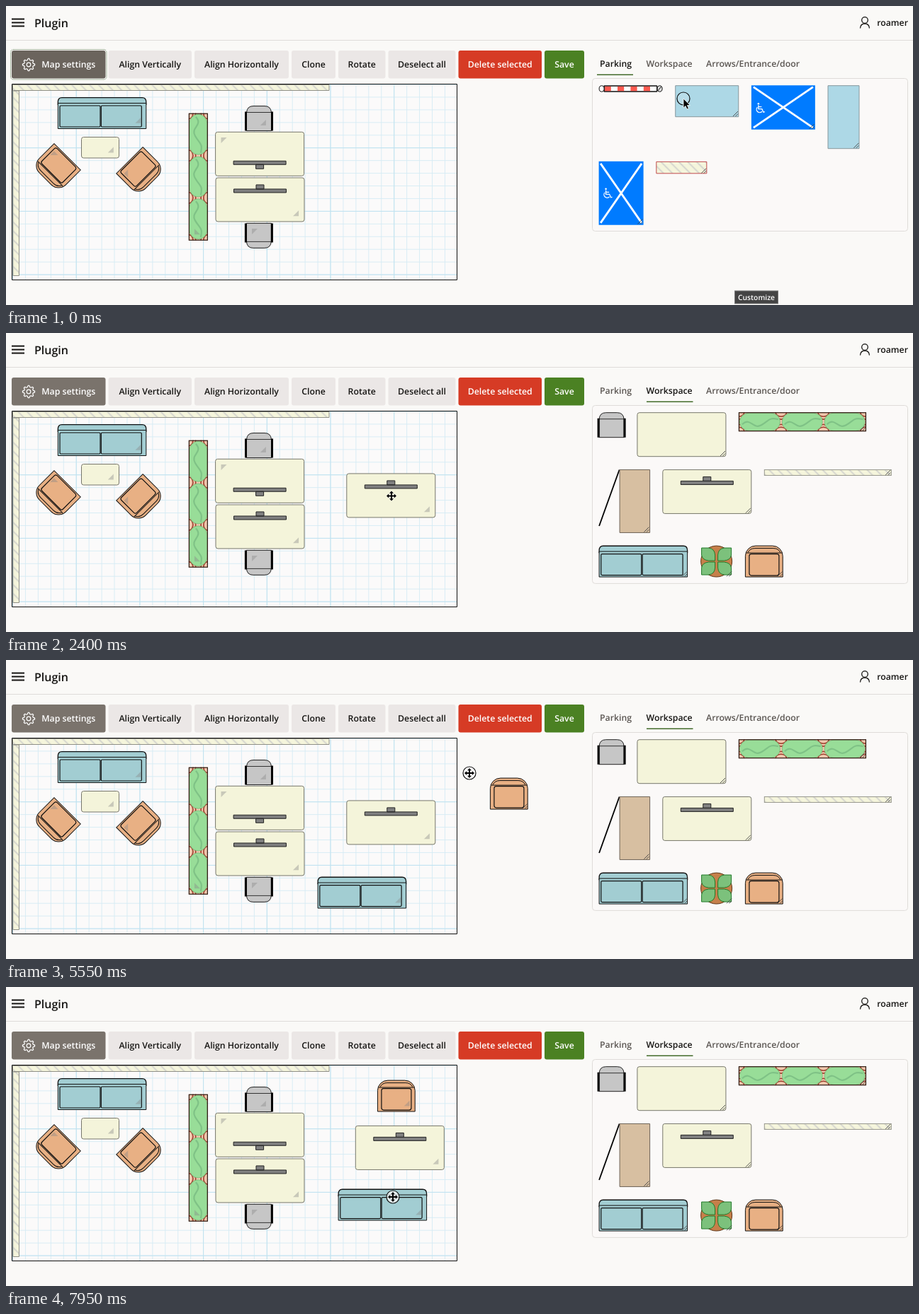
These frames come from a looping animation (1280x423 px, 8000 ms). An HTML page:

```html
<!DOCTYPE html>
<html lang="en">
<head>
<meta charset="utf-8">
<title>Floor plan editor</title>
<style>
html, body { margin: 0; width: 100%; height: 100%; overflow: hidden; background: #faf9f7; }
svg { display: block; width: 100%; height: 100%; }
text { font: 600 12.3px "Open Sans", "Noto Sans", sans-serif; fill: #161513; text-rendering: geometricPrecision; }
.mid { text-anchor: middle; }
.light { fill: #fff; }
.tab { fill: #5b5652; }
.tab.on { fill: #161513; }
</style>
</head>
<body>
<svg viewBox="0 0 1280 423">
  <defs>
    <pattern id="hatch" width="8.9" height="8.9" patternUnits="userSpaceOnUse" patternTransform="rotate(-45)">
      <rect width="9" height="9" fill="#f5f5dc"/><path d="M4.5 0V9" stroke="#d0d0cc" stroke-width="1.7"/>
    </pattern>
    <pattern id="fine" x="9" y="110.5" width="17.94" height="17.94" patternUnits="userSpaceOnUse">
      <path d="M0 .5H18M.5 0V18" stroke="#d5ebf4" stroke-width=".9"/>
    </pattern>
    <pattern id="coarse" x="9" y="110.5" width="89.7" height="89.7" patternUnits="userSpaceOnUse">
      <path d="M0 .5H90M.5 0V90" stroke="#bfe2f0"/>
    </pattern>
    <path id="grip" d="M-8 -1L-1 -8M-4.5 -1L-1 -4.5" stroke="#444" stroke-width=".9"/>
    <path id="corner" d="M-8 -16V-8H-16Z" fill="#888" opacity=".4"/>

    <g id="sofa" fill="#a2cdd2" stroke="#111">
      <path d="M.5 10V7Q.5 .7 6 .7H119.5Q125 .7 125 7V10Z" stroke-width="1.3"/>
      <path d="M.5 8.5H125V44.5H.5Z"/>
      <rect x="3.2" y="12" width="57" height="30" rx="1.5" stroke-width="1.2"/>
      <rect x="61.5" y="12" width="57" height="30" rx="1.5" stroke-width="1.2"/>
    </g>
    <g id="arm" fill="#e8b084" stroke="#111">
      <path d="M.5 44.5V15A14.5 14.5 0 0 1 15 .5H38.8A14.5 14.5 0 0 1 53.3 15V44.5Z"/>
      <path d="M2 10.5H52M4 10Q7 4 14 4H40Q47 4 50 10" fill="none"/>
      <rect x="6" y="12" width="42" height="30.5" rx="3" stroke-width="1.2"/>
    </g>
    <g id="chair" transform="translate(-2)">
      <path d="M2.5 35.5V10Q3 .5 12 .5H28Q37 .5 37.5 10V35.5Z" fill="#c6c6c6" stroke="#222"/>
      <path d="M2.5 9.5H37.5" stroke="#333"/>
      <path d="M1.5 8.5V35.5M38.5 8.5V35.5" stroke="#000" stroke-width="3"/>
    </g>
    <rect id="table" x=".5" y=".5" width="125" height="62" rx="3" fill="#f4f4da" stroke="#77776c"/>
    <g id="desk">
      <use href="#table"/>
      <path d="M26 16.5H100V21.5H26ZM57.5 10.5H68.5V16.5H57.5Z" fill="#808080" stroke="#222"/>
    </g>
    <rect id="coffee" x=".5" y=".5" width="53" height="29.5" rx="3" fill="#f4f4da" stroke="#77776c"/>
    <g id="bush">
      <path d="M0 6q7 0 8-6M0 10q5-1 7-4M0 17q5 1 7 4M0 21q7 0 8 6M60 6q-7 0-8-6M60 10q-5-1-7-4M60 17q-5 1-7 4M60 21q-7 0-8 6" fill="none" stroke="#9a3a28" stroke-width="1.6"/>
      <rect x="1.5" y="1" width="57" height="25" rx="13" fill="#98dd98" stroke="#78b878" stroke-width=".8"/>
      <path d="M5 17C17 6 20 25 32 18S42 7 56 10" fill="none" stroke="#7fc286" stroke-width="2.2"/>
    </g>
    <g id="hedge">
      <rect width="179.5" height="27" fill="#efc7ad"/>
      <use href="#bush"/><use href="#bush" x="59.8"/><use href="#bush" x="119.6"/>
      <rect x=".5" y=".5" width="179" height="26" fill="none" stroke="#2d1a12" stroke-width="1.2"/>
    </g>
    <g id="door">
      <path d="M.5 80L29 .5" stroke="#000" stroke-width="1.8"/>
      <path d="M29.5 .5H72V89.5H29.5Z" fill="#d7bfa1" stroke="#6d6255"/>
    </g>
    <rect id="wall" x=".5" y=".5" width="179" height="8" fill="url(#hatch)" stroke="#96968c"/>
    <path id="leaf" d="M-2 -1H-11Q-20 -2 -21 -9V-19H-11Q-2.5 -18 -2 -9Z" fill="#7cc17c" stroke="#237a2b"/>
    <g id="plant" transform="translate(22.5 22.5)">
      <circle r="22" fill="#c67f4a" stroke="#5c3518"/>
      <use href="#leaf"/><use href="#leaf" transform="scale(-1 1)"/>
      <use href="#leaf" transform="scale(1 -1)"/><use href="#leaf" transform="scale(-1)"/>
    </g>
    <g id="wheelchair" fill="none" stroke="#fff" stroke-width="1.3">
      <circle cx="-2" cy="-6" r="1.3" fill="#fff" stroke="none"/>
      <path d="M-2 -4V1.5H3L5 6 7 5.5M-2 -1.5H2.5M-3.5 -1A4.3 4.3 0 1 0 3 5"/>
    </g>
    <g id="bayH"><path d="M0 0H90V62.5H0Z" fill="#007bff"/>
      <path d="M3 2.5L87 60M87 2.5L3 60" stroke="#fff" stroke-width="2.8"/><use href="#wheelchair" x="12" y="32"/></g>
    <g id="bayV"><path d="M0 0H63V90H0Z" fill="#007bff"/>
      <path d="M2.5 3L60.5 87M60.5 3L2.5 87" stroke="#fff" stroke-width="2.8"/><use href="#wheelchair" x="12" y="45"/></g>
    <path id="spotH" d="M.5 .5H89.5V44.5H.5Z" fill="#add8e6" stroke="#87979c"/>
    <path id="spotV" d="M.5 .5H44.5V89.5H.5Z" fill="#add8e6" stroke="#87979c"/>
    <path id="strip" d="M.5 .5H71.5V17H.5Z" fill="url(#hatch)" stroke="#c04a4a"/>
    <g id="barrier" stroke="#111">
      <path d="M7.5 .8H82V8.8H7.5Z" fill="#fff"/>
      <path d="M8 4.8H82" stroke="#ff5a50" stroke-width="7" stroke-dasharray="9.2"/>
      <path d="M7.5 .8H82V8.8H7.5Z" fill="none" stroke-width="1.2"/>
      <ellipse cx="4" cy="4.8" rx="3.5" ry="4.2" fill="#fff"/>
      <ellipse cx="86" cy="4.8" rx="3.5" ry="4.2" fill="#ddd"/><path d="M83.5 7.5L88 2"/>
    </g>
  </defs>

  <path d="M0 48.5H1280" stroke="#dfdcd9"/>
  <path d="M8 18.5H26M8 23.5H26M8 28.5H26" stroke="#161513" stroke-width="1.8"/>
  <text x="40" y="29.5" style="font-size:16px">Plugin</text>
  <g fill="none" stroke="#161513" stroke-width="1.3">
    <circle cx="1212" cy="20" r="4.3"/><path d="M1205.5 31.5Q1206 25 1212 25T1218.5 31.5"/>
  </g>
  <text x="1273" y="28" text-anchor="end">roamer</text>

  <g id="buttons"></g>
  <rect id="focus" x="6.5" y="61.5" width="135.5" height="42.5" rx="4" fill="none" stroke="#54734a" stroke-dasharray="1 1"/>
  <path id="gear" fill="none" stroke="#fff" stroke-width="1.2" stroke-linejoin="round"/>
  <circle cx="32" cy="83" r="2.8" fill="none" stroke="#fff" stroke-width="1.2"/>

  <path d="M8.5 110.5H636.5V387.5H8.5Z" fill="#fbfafa"/>
  <path d="M8.5 110.5H636.5V387.5H8.5Z" fill="url(#fine)"/>
  <path d="M8.5 110.5H636.5V387.5H8.5Z" fill="url(#coarse)"/>
  <path d="M9.5 111.5H456V119.5H9.5ZM10 120H18.5V381.5H10Z" fill="url(#hatch)" stroke="#8f8f86"/>
  <path d="M8.5 110.5H636.5V387.5H8.5Z" fill="none" stroke="#111"/>
  <g id="board"></g>

  <text class="tab" id="tabParking" x="838" y="86">Parking</text>
  <text class="tab" id="tabWork" x="903.5" y="86">Workspace</text>
  <text class="tab" x="988" y="86">Arrows/Entrance/door</text>
  <path id="underline" stroke="#436b2a" stroke-width="1.5"/>
  <rect id="panel" x="827.5" y="102.5" width="445" rx="4" fill="#fbf9f8" stroke="#dfdcd9"/>
  <g id="parking"></g>
  <g id="workspace"></g>
  <g id="tooltip">
    <rect x="1028.5" y="403" width="61" height="18" fill="#444" stroke="#777"/>
    <text class="mid light" x="1059" y="415.5" style="font-size:10.3px">Customize</text>
  </g>
  <g id="dragged"></g>
  <g id="cursor">
    <circle id="press" r="9" fill="#fff" stroke="#111" stroke-width="1.2"/>
    <path id="arrow" d="M0 0V13.2L3 10.4 5 15 7.4 14 5.4 9.5H9.4Z" fill="#000" stroke="#fff" stroke-width=".8"/>
    <path id="move" d="M0 -7L3 -3.8H1V-1H3.8V-3L7 0 3.8 3V1H1V3.8H3L0 7 -3 3.8H-1V1H-3.8V3L-7 0-3.8 -3V-1H-1V-3.8H-3Z" fill="#000" stroke="#fff" stroke-width=".7" paint-order="stroke"/>
  </g>
</svg>
<script>
const $ = id => document.getElementById(id);
const show = (el, on) => el.style.display = on ? '' : 'none';

// Furniture sizes in grid units.
const UNIT = 8.97;
const SIZE = { sofa: [14, 5], arm: [6, 5], chair: [4, 4], desk: [14, 7], table: [14, 7], coffee: [6, 3.4],
  hedge: [20, 3], door: [8, 10], wall: [20, 1], plant: [5, 5], barrier: [10, 1], bayH: [10, 7], bayV: [7, 10],
  spotH: [10, 5], spotV: [5, 10], strip: [8, 2] };
const sizeOf = kind => SIZE[kind].map(n => n * UNIT);

function item(kind, x, y, handle, turn = 0) {
  const [w, h] = sizeOf(kind);
  return `<g transform="translate(${x} ${y}) rotate(${turn} ${w / 2} ${h / 2})"><use href="#${kind}"/>` +
    (handle ? `<use href="#${handle}" x="${w}" y="${h}"/>` : '') + '</g>';
}

// Lays a palette out in wrapping rows; returns the panel height. Remembers where each kind starts.
const home = {};
function palette(id, kinds) {
  const left = 836.6, gap = 2 * UNIT;
  let x = left, y = 112.2, row = 0;
  for (const kind of kinds.split(' ')) {
    const [w, h] = sizeOf(kind);
    if (x + w > 1264) { x = left; y += row + gap; row = 0; }
    home[kind] = [x, y];
    $(id).innerHTML += item(kind, x, y, /chair|barrier/.test(kind) ? '' : 'grip');
    x += w + gap;
    row = Math.max(row, h);
  }
  return y + row + UNIT - 102.5;
}
const parkingHeight = palette('parking', 'barrier spotH bayH spotV bayV strip');
const workHeight = palette('workspace', 'chair table hedge door desk wall sofa plant arm');

$('board').innerHTML = [
  ['sofa', 72.8, 129], ['coffee', 106, 185], ['arm', 44.1, 206.5, 225], ['arm', 163.1, 211.5, 135],
  ['hedge', 181.7, 228, 90], ['chair', 339, 141], ['chair', 339, 307, 180],
  ['desk', 295.5, 178, 180], ['desk', 295.5, 242.5],
].map(([kind, x, y, turn]) => item(kind, x, y, 'corner', turn)).join('');

const GREY = '#ebe7e6';
let left = 8;
$('buttons').innerHTML = [
  ['Map settings', 140.5, '#7a736c', 14], ['Align Vertically', 262], ['Align Horizontally', 399], ['Clone', 465],
  ['Rotate', 535.5], ['Deselect all', 634.5], ['Delete selected', 756, '#d63b25'], ['Save', 816, '#4b8123'],
].map(([label, right, fill = GREY, shift = 0]) => {
  const width = right - left, mid = left + width / 2 + shift;
  const button = `<rect x="${left}" y="63" width="${width}" height="39.5" rx="3" fill="${fill}"/>` +
    `<text class="mid ${fill === GREY ? '' : 'light'}" x="${mid}" y="87.3">${label}</text>`;
  left = right + 4;
  return button;
}).join('');
const settings = $('buttons').firstChild;

$('gear').setAttribute('d', 'M' + Array.from({ length: 32 }, (_, i) => {
  const a = (i - .5) * Math.PI / 16, r = i % 4 < 2 ? 8.6 : 6.5;
  return `${32 + r * Math.cos(a)} ${83 + r * Math.sin(a)}`;
}).join('L') + 'Z');

// Pointer glides: start ms, end ms, destination.
const glides = [
  [100, 450, 935, 84], [750, 1500, 990, 225],
  [1700, 2150, 544, 230.5], [2400, 3150, 957, 292], [3200, 3450, 940, 318], [3600, 3750, 940, 325],
  [3770, 4100, 556, 310], [4100, 4200, 549, 309], [4200, 4450, 543, 331], [4500, 5250, 1063, 329],
  [5300, 5450, 703, 195], [5450, 5550, 654, 160], [5550, 5800, 544, 160], [6150, 6450, 541, 250],
  [6600, 6650, 553.5, 247.5], [6900, 7500, 517, 318], [7500, 7850, 546, 297],
];
const drags = [['desk', 1500, 2400], ['sofa', 3750, 4500], ['arm', 5250, 6150], ['desk', 6600, 6900], ['sofa', 7500, 8000]];
const clicks = [0, 450];
const STEP = 150, LOOP = 8000, LAG = 100, TAB_SWITCH = 600, MAP_RIGHT = 637;

const clamp = (v, lo, hi) => Math.min(Math.max(v, lo), hi);
function pointer(t) {
  let x = 956, y = 131;
  for (const [from, to, endX, endY] of glides) {
    const u = clamp((t - from) / (to - from), 0, 1), k = u * u * (3 - 2 * u);
    x += (endX - x) * k;
    y += (endY - y) * k;
  }
  return [x, y];
}

// A clone starts at its palette place and trails the pointer during each of its drags.
function clone(kind, t) {
  const own = drags.filter(d => d[0] === kind), [, firstPress, firstRelease] = own[0];
  if (t < firstPress) return '';
  let [x, y] = home[kind];
  for (const [, press, release] of own) {
    const [x0, y0] = pointer(press), [x1, y1] = pointer(clamp(t - LAG, press, release));
    x += x1 - x0;
    y += y1 - y0;
  }
  return item(kind, x, y, t < firstRelease ? 'grip' : 'corner');
}

function draw(t) {
  const work = t >= TAB_SWITCH;
  show($('parking'), !work);
  show($('workspace'), work);
  show($('tooltip'), !work);
  show($('focus'), !work);
  settings.setAttribute('fill', work ? '#7a736c' : '#6b645d');
  $('tabParking').classList.toggle('on', !work);
  $('tabWork').classList.toggle('on', work);
  $('underline').setAttribute('d', work ? 'M904 97.2H969.5' : 'M834 97.2H885');
  $('panel').setAttribute('height', work ? workHeight : parkingHeight);
  $('dragged').innerHTML = ['desk', 'arm', 'sofa'].map(kind => clone(kind, t)).join('');

  const [x, y] = pointer(t);
  const drag = drags.find(([, press, release]) => t >= press && t < release);
  const moving = x < MAP_RIGHT || Boolean(drag && t > drag[1]);
  $('cursor').setAttribute('transform', `translate(${x} ${y})`);
  show($('press'), drag || clicks.includes(t));
  $('press').setAttribute('fill-opacity', moving ? .7 : .15);
  show($('move'), moving);
  show($('arrow'), !moving);
}

function tick(now) {
  draw(Math.floor(now % LOOP / STEP) * STEP);
  requestAnimationFrame(tick);
}
draw(0);
requestAnimationFrame(tick);
</script>
</body>
</html>
```
